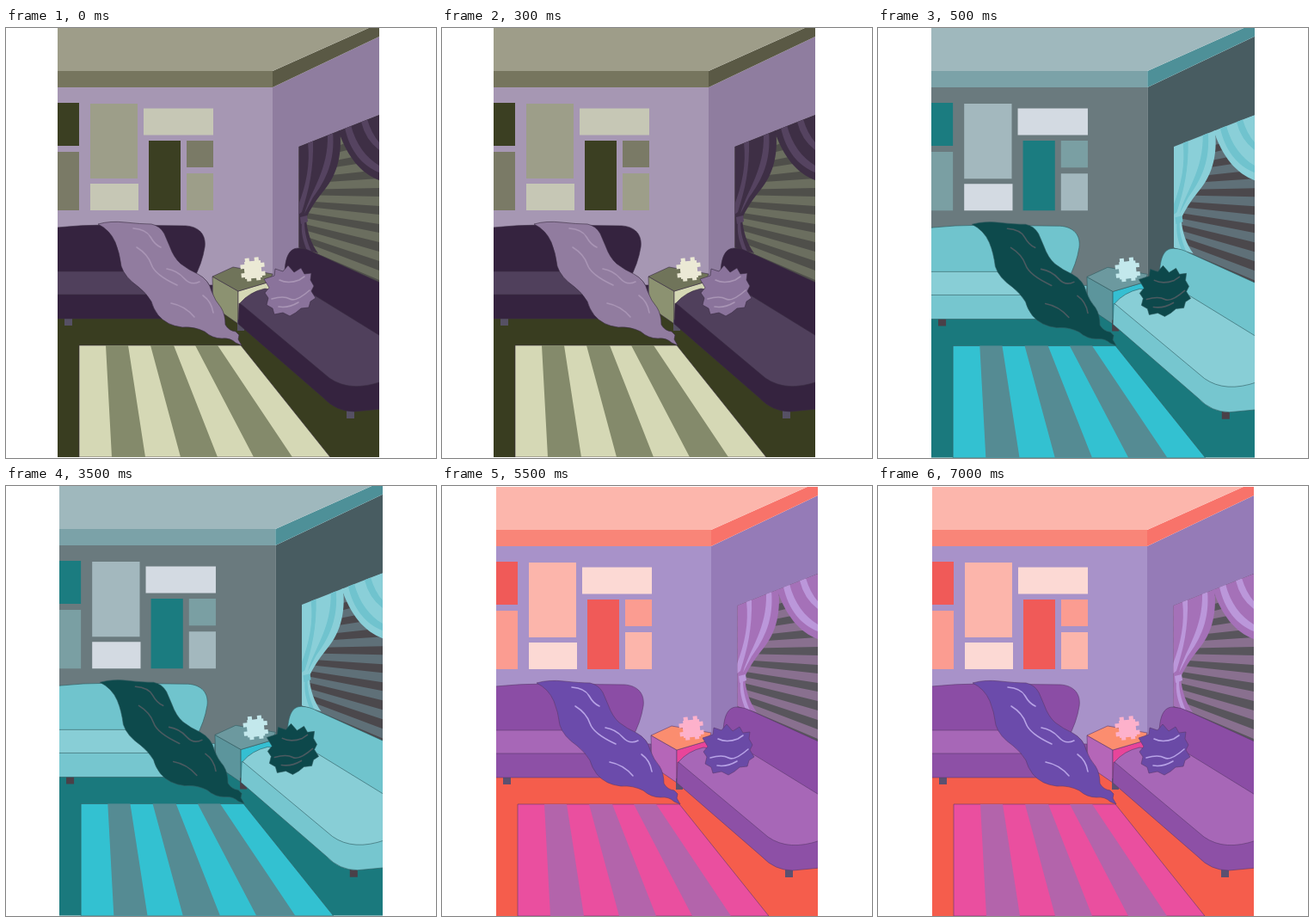
An HTML page without scripts that plays this animation: 500x500 px, repeating every 8 s.

```html
<!DOCTYPE html>
<html lang="en">
<head>
<meta charset="utf-8">
<title>Living room in three palettes</title>
<style>
html, body { margin: 0; width: 100%; height: 100%; overflow: hidden; background: #fff; }
svg { display: block; width: 100vw; height: 100vh; }

/* One drawing, three palettes with hard cuts between them */
.look { visibility: hidden; animation: 8s step-end infinite; }
.olive { animation-name: first; }
.teal { animation-name: second; }
.coral { animation-name: third; }
@keyframes first { 0% { visibility: visible } 6.25%, 100% { visibility: hidden } }
@keyframes second { 0% { visibility: hidden } 6.25% { visibility: visible } 68.75%, 100% { visibility: hidden } }
@keyframes third { 0% { visibility: hidden } 68.75%, 100% { visibility: visible } }

.olive {
  --ceiling: #9e9d89; --trim: #76755e; --cove: #5a5945; --wall: #a697b3; --side: #8f7d9f;
  --art1: #3b3f22; --art2: #7a7a66; --art3: #9d9e89; --art4: #c6c7b5;
  --blind: #4f4f4a; --slat: #6b6e5f; --drape: #3e2f45; --fold: #554360;
  --floor: #393d20; --rug: #d5d8b5; --band: #848a6b;
  --back: #35233f; --seat: #50405c; --front: #35233f; --foot: #565064;
  --top: #70745a; --left: #8c9271; --right: #d5d8b5; --puzzle: #ebe9d5;
  --throw: #917c9f; --pillow: #8a739b; --shine: #a995b5; --line: #3a2d42;
}
.teal {
  --ceiling: #9fb8bd; --trim: #7ba2a8; --cove: #4e9098; --wall: #6a7a7e; --side: #485c61;
  --art1: #1b7c80; --art2: #7a9fa3; --art3: #a3b8be; --art4: #d3dae2;
  --blind: #4b484c; --slat: #5f7078; --drape: #8acfd8; --fold: #70c3ce;
  --floor: #1a797d; --rug: #33c1d1; --band: #558b93;
  --back: #70c4cd; --seat: #88ced6; --front: #76c6cf; --foot: #4a4048;
  --top: #6c999f; --left: #5c959c; --right: #35bfd2; --puzzle: #c3e8ec;
  --throw: #0d4a4c; --pillow: #0d484b; --shine: #4b5a60; --line: #2f5a60;
}
.coral {
  --ceiling: #fcb6ac; --trim: #f98578; --cove: #f8736a; --wall: #a892c9; --side: #957bb7;
  --art1: #f05a58; --art2: #fb9c91; --art3: #fcb5ab; --art4: #fcd9d4;
  --blind: #58555c; --slat: #89708f; --drape: #a571b8; --fold: #bb97da;
  --floor: #f55d4c; --rug: #ea4f9f; --band: #b364ab;
  --back: #8b4da5; --seat: #a767b7; --front: #8d50a6; --foot: #5c5070;
  --top: #fb8d6f; --left: #b566b8; --right: #e8459a; --puzzle: #fdb1cb;
  --throw: #6b4bab; --pillow: #6a4aa6; --shine: #b7a2e6; --line: #5b3a6e;
}

.ceiling { fill: var(--ceiling) } .trim { fill: var(--trim) } .cove { fill: var(--cove) }
.wall { fill: var(--wall) } .side { fill: var(--side) }
.art1 { fill: var(--art1) } .art2 { fill: var(--art2) }
.art3 { fill: var(--art3) } .art4 { fill: var(--art4) }
.blind { fill: var(--blind) } .slat { fill: var(--slat) }
.drape { fill: var(--drape) } .fold { fill: var(--fold) }
.floor { fill: var(--floor) } .rug { fill: var(--rug) } .band { fill: var(--band) }
.back { fill: var(--back) } .seat { fill: var(--seat) }
.front { fill: var(--front) } .foot { fill: var(--foot) }
.top { fill: var(--top) } .left { fill: var(--left) } .right { fill: var(--right) }
.puzzle { fill: var(--puzzle) } .throw { fill: var(--throw) } .pillow { fill: var(--pillow) }
.shine { fill: none; stroke: var(--shine); stroke-width: 1.6; stroke-linecap: round }
.lined { stroke: var(--line); stroke-width: .6; stroke-linejoin: round }
</style>
</head>
<body>
<svg viewBox="0 0 500 500">
  <defs>
    <clipPath id="frame"><rect x="63" y="1" width="374" height="499"/></clipPath>
    <clipPath id="pane"><path d="M343.500 139 437 102V300L343.500 258Z"/></clipPath>

    <g id="room" clip-path="url(#frame)">
      <!-- Walls and ceiling -->
      <path class="wall" d="M63 70H313V330H63Z"/>
      <path class="side" d="M313 70 437 11V400H313Z"/>
      <path class="trim" d="M63 51H313V70H63Z"/>
      <path class="cove" d="M313 51 427 0H437V11L313 70Z"/>
      <path class="ceiling" d="M63 0H427L313 51H63Z"/>
      <path class="floor" d="M63 312H313L437 400V500H63Z"/>

      <!-- Pictures -->
      <path class="art1" d="M63 88H88V138H63ZM169 132H206V213H169Z"/>
      <path class="art2" d="M63 145H88V213H63ZM213 132H244V163H213Z"/>
      <path class="art3" d="M101 89H156V176H101ZM213 170H244V213H213Z"/>
      <path class="art4" d="M101 182H157V213H101ZM163 94.500H244V125.500H163Z"/>

      <!-- Window: slats fan out from the vanishing point -->
      <g clip-path="url(#pane)">
        <path class="blind" d="M343 100H437V300H343Z"/>
        <path class="slat" d="M197 192 437 113V124ZM197 192 437 134V145ZM197 192 437 155V166ZM197 192 437 176V187ZM197 192 437 197V208ZM197 192 437 218V229ZM197 192 437 239V250ZM197 192 437 261V272ZM197 192 437 283V294Z"/>
        <path class="drape" d="M343 138 391 118C395 152 386 175 371 192Q359 207 352 222C353 238 358 252 366 263L343 256Z"/>
        <path class="fold" d="M354 134 360 131C361 165 355 190 347 215L343 218V207C352 183 357 160 354 134ZM377 125 383 122C386 155 375 178 360 198L350 217C358 189 378 166 377 125ZM347 228 350 226C350 241 354 251 358 261L353 260C348 248 346 238 347 228Z"/>
        <path class="drape" d="M389 119 437 102V178C416 170 400 152 389 119Z"/>
        <path class="fold" d="M397 117 404 114C410 137 422 152 437 161V169C417 161 403 144 397 117ZM416 110 423 107Q428 124 437 134V143Q421 131 416 110Z"/>
      </g>
      <path class="fold" d="M345 221 353 219 354 226 346 229Z"/>

      <!-- Rug -->
      <path class="rug lined" d="M88 370H276L380 500H88Z"/>
      <path class="band" d="M119 370H145L165 500H126ZM171 370H198L249 500H206ZM223 370H249L336 500H291Z"/>

      <!-- Left sofa -->
      <path class="foot" d="M71 338H80V347H71Z"/>
      <g class="lined">
        <path class="back" d="M62 233Q90 230 120 230L212 231C228 232 236 242 234 256Q231 275 221 293H62Z"/>
        <path class="front" d="M62 300H243Q243 328 230 339H62Z"/>
        <path class="seat" d="M62 284H212Q236 288 241 304L242 311H62Z"/>
      </g>

      <!-- Side table -->
      <g class="lined">
        <path class="left" d="M243 290 273 307V345L244 325Z"/>
        <path class="right" d="M273 307 310 296V330L273 345Z"/>
        <path class="top" d="M243 290 267 279 313 287 310 296 273 307Z"/>
      </g>
      <path class="puzzle" transform="translate(290 282) rotate(-6)" d="M-9-10H-8V-14H-3V-10H3V-14H8V-10H10V-7H14V-2H10V3H14V8H10V10H8V13H3V10H-3V13H-8V10H-10V8H-14V3H-10V-2H-14V-7H-9Z"/>

      <!-- Right sofa -->
      <path class="foot" d="M399 444H408V455H399ZM272 340H280V353H272Z"/>
      <g class="lined">
        <path class="back" d="M327 300C326 272 330 257 343 257Q352 257 363 263L440 298V362L363 314Z"/>
        <path class="front" d="M274 321 273 345 372 431Q387 447 408 447L440 444V390Z"/>
        <path class="seat" d="M275 321Q286 308 304 304L362 312 440 360V412Q403 425 379 408Z"/>
      </g>

      <!-- Pillow -->
      <path class="pillow lined" d="M303 293 315 289 316 281 325 284 331 277 338 285 346 280 350 287 358 286 357 294 361 301 358 307 363 315 357 319 355 326 346 327 340 332 333 336 325 332 315 334 313 327 306 323 308 315 304 309 309 303Z"/>
      <path class="shine" d="M321 294Q331 299 344 294L350 290M312 316Q326 312 333 316T356 306M320 325Q331 327 343 320"/>

      <!-- Throw -->
      <path class="throw lined" d="M110 229Q124 225 142 227T172 229Q182 231 187 240 190 247 193 254 198 268 206 275 215 282 226 287 239 294 242 307 246 318 253 326 258 334 258 346 262 353 270 354L274 358 273 363 277 370 270 367Q264 361 254 362 243 362 234 354 222 348 208 349 190 347 180 335 174 327 172 319 166 309 157 302 141 291 137 278 135 262 130 250 124 236 110 229Z"/>
      <path class="shine" d="M151 234Q166 235 171 244T183 256M155 256Q168 264 172 276T202 300M190 281Q202 283 210 292T228 296M232 312Q242 319 244 332M195 321Q211 324 222 337"/>
    </g>
  </defs>

  <g class="look olive"><use href="#room" transform="translate(-3 -1)"/></g>
  <g class="look teal"><use href="#room" transform="matrix(1.0053 0 0 1.002 -1.33 -1.2)"/></g>
  <g class="look coral"><use href="#room"/></g>
</svg>
</body>
</html>
```
